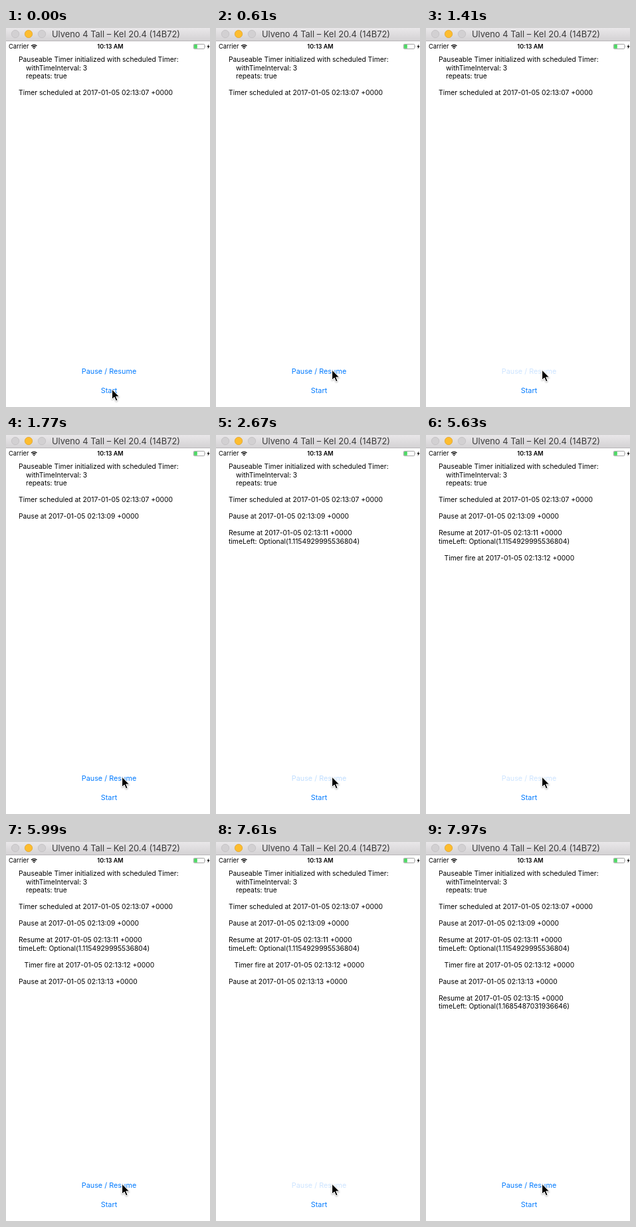
Write an HTML page that moves like this. It is 307 by 571 pixels and loops after 8 s.

```html
<!DOCTYPE html>
<html lang="en">
<head>
<meta charset="utf-8">
<title>Pauseable Timer</title>
<style>
  html, body { margin: 0; width: 100%; height: 100%; overflow: hidden; background: #fff; }
  svg { display: block; width: 307px; height: 571px; }
  text { font-family: Inter, Roboto, "Liberation Sans", sans-serif; font-size: 10.3px; fill: #000; }
  .mid { text-anchor: middle; }
  .title { font-size: 12.9px; fill: #3a3a3a; }
  .carrier { font-size: 9.3px; }
  .clock { font-size: 9px; font-weight: 600; }
  .button { font-size: 10.85px; fill: #007aff; }
</style>
</head>
<body>
<svg viewBox="0 0 307 571">
  <defs>
    <linearGradient id="bar" x2="0" y2="1">
      <stop stop-color="#e9e7e9"/>
      <stop offset="1" stop-color="#d3d1d3"/>
    </linearGradient>
    <filter id="shadow" x="-50%" y="-50%" width="200%" height="200%">
      <feDropShadow dx="0" dy="1" stdDeviation="0.8" flood-opacity="0.35"/>
    </filter>
  </defs>

  <rect width="307" height="571" fill="#fff"/>
  <rect width="307" height="20" fill="url(#bar)"/>
  <rect y="19" width="307" height="1" fill="#b9b7b9"/>
  <g stroke-width="0.7">
    <circle cx="14" cy="9" r="5.7" fill="#d2d0d2" stroke="#bdbbbd"/>
    <circle cx="34" cy="9" r="5.7" fill="#fdbd2f" stroke="#dfa023"/>
    <circle cx="54" cy="9" r="5.7" fill="#d2d0d2" stroke="#bdbbbd"/>
  </g>
  <text class="title mid" x="165.5" y="14">Ulveno 4 Tall – Kel 20.4 (14B72)</text>

  <text class="carrier" x="4" y="31">Carrier</text>
  <g fill="none" stroke="#000" stroke-width="1.4">
    <path d="M38 27.1a6 6 0 0 1 8.4 0"/>
    <path d="M39.8 29a3.4 3.4 0 0 1 4.8 0"/>
  </g>
  <path d="M42.2 31.7l-1.3-1.5a1.9 1.9 0 0 1 2.6 0z"/>
  <text class="clock mid" x="157" y="31">10:13 AM</text>
  <rect x="282.4" y="24.4" width="16.4" height="7" rx="1.2" fill="none" stroke="#777" stroke-width="0.7"/>
  <rect x="283.1" y="25.1" width="4.7" height="5.6" rx="0.5" fill="#4cd964"/>
  <path d="M299.8 26.6q1.2 1.3 0 2.6z" fill="#777"/>
  <path d="M305.4 24.2l-3 4.3h1.9l-.8 3.2 3.1-4.4h-2z"/>

  <g id="log"></g>
  <text class="button mid" id="pause" x="155" y="521.4">Pause / Resume</text>
  <text class="button mid" x="155" y="549.8">Start</text>
  <g id="cursor" filter="url(#shadow)">
    <path d="M0 0V15.2L3.5 11.9L6 17.6L8.5 16.5L6.1 11H11Z" stroke="#fff" stroke-width="1" stroke-linejoin="round"/>
  </g>
</svg>
<script>
const LOOP = 8000;
const STEP = 90;

// [appears at ms, line number, x, text]
const LINES = [
  [0, 0, 19, "Pauseable Timer initialized with scheduled Timer:"],
  [0, 1, 30, "withTimeInterval: 3"],
  [0, 2, 30, "repeats: true"],
  [0, 4, 19, "Timer scheduled at 2017-01-05 02:13:07 +0000"],
  [1500, 6, 19, "Pause at 2017-01-05 02:13:09 +0000"],
  [2670, 8, 19, "Resume at 2017-01-05 02:13:11 +0000"],
  [2670, 9, 19, "timeLeft: Optional(1.1154929995536804)"],
  [3830, 11, 27.5, "Timer fire at 2017-01-05 02:13:12 +0000"],
  [5720, 13, 19, "Pause at 2017-01-05 02:13:13 +0000"],
  [7700, 15, 19, "Resume at 2017-01-05 02:13:15 +0000"],
  [7700, 16, 19, "timeLeft: Optional(1.1685487031936646)"]
];

// Moments the button is released, and those preceded by a visible press
const RELEASES = [1500, 2670, 5720, 7700];
const PRESSES = [1410, 5630, 7610];
const FADE = [0.25, 0.55, 0.85];

// [ms, x, y] of the pointer tip
const POINTER = [
  [0, 159.5, 544.3],
  [90, 160.5, 542],
  [180, 163.5, 536],
  [270, 168.5, 528],
  [340, 173, 521],
  [430, 176, 517],
  [520, 175.5, 515.6],
  [610, 174.6, 515.2]
];

const $ = id => document.getElementById(id);

const lines = LINES.map(([at, row, x, content]) => {
  const el = document.createElementNS("http://www.w3.org/2000/svg", "text");
  el.setAttribute("x", x);
  el.setAttribute("y", 51.1 + row * 12.52);
  el.textContent = content;
  $("log").append(el);
  return { at, el };
});

function buttonAlpha(t) {
  if (PRESSES.some(p => t >= p && t < p + STEP)) return 0.2;
  const release = RELEASES.findLast(r => t >= r);
  return FADE[Math.floor((t - release) / STEP)] ?? 1;
}

function draw(t) {
  for (const { at, el } of lines) el.style.display = t >= at ? "" : "none";
  $("pause").setAttribute("fill-opacity", buttonAlpha(t));
  const [, x, y] = POINTER.findLast(p => t >= p[0]);
  $("cursor").setAttribute("transform", `translate(${x} ${y})`);
}

function tick() {
  draw(performance.now() % LOOP);
  requestAnimationFrame(tick);
}
tick();
</script>
</body>
</html>
```
